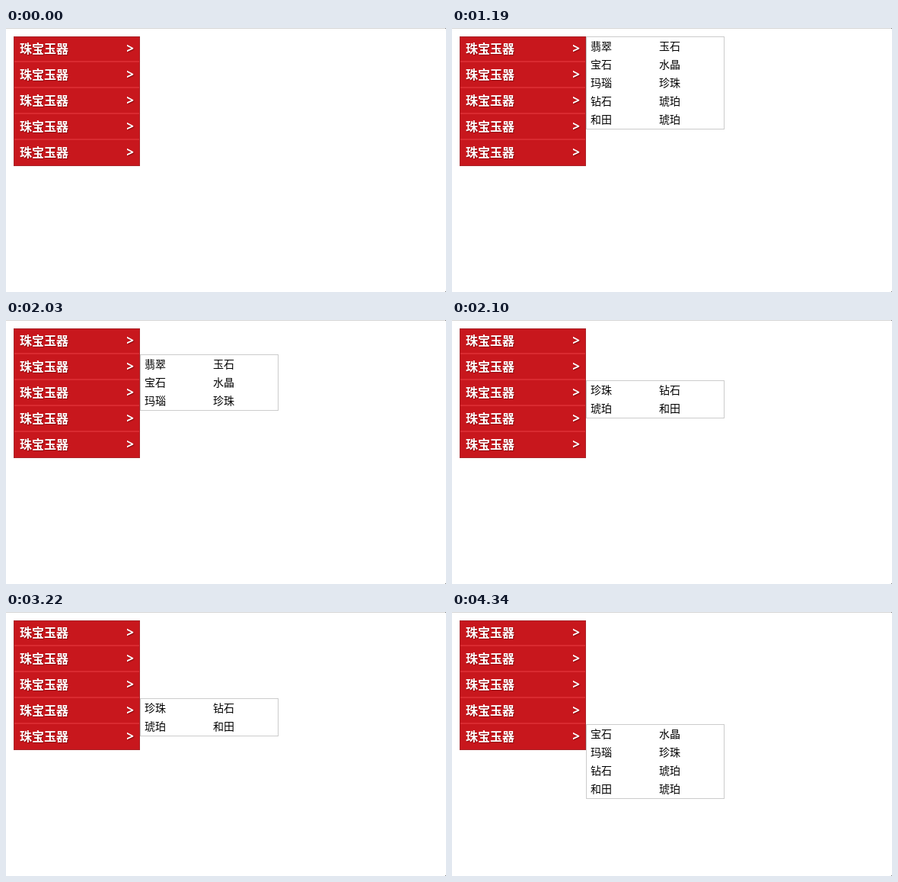
These frames come from a looping animation (578x346 px, 4.41 s). An HTML page:

```html
<!DOCTYPE html>
<html lang="zh-CN">
<head>
<meta charset="utf-8">
<title>Flyout menu</title>
<style>
  html, body { margin: 0; width: 100%; height: 100%; overflow: hidden; background: #fff; }
  svg { display: block; width: 578px; height: 346px; }
  text { font-family: "Noto Sans CJK SC", "Noto Sans CJK", sans-serif; }
  .label { font-size: 16px; font-weight: 700; fill: #fff; text-shadow: 1px 1px 1px #8a0c10; }
  .arrow { font: 700 17px "Noto Sans", sans-serif; fill: #fff; text-anchor: middle; text-shadow: 1px 1px 1px #8a0c10; }
  .item { font-size: 14px; fill: #000; }
</style>
</head>
<body>
<svg id="stage" viewBox="0 0 578 346"></svg>
<script>
const LOOP = 4410, TOP = 11, ROW = 34, LINE = 24;
const stage = document.getElementById('stage');

const menus = [
  { start: 980, items: '翡翠 玉石 宝石 水晶 玛瑙 珍珠 钻石 琥珀 和田 琥珀' },
  { start: 1540, items: '翡翠 玉石 宝石 水晶 玛瑙 珍珠' },
  { start: 2100, items: '珍珠 钻石 琥珀 和田' },
  { start: 2660, items: '珍珠 钻石 琥珀 和田' },
  { start: 3430, items: '宝石 水晶 玛瑙 珍珠 钻石 琥珀 和田 琥珀' }
];

function add(parent, tag, attrs, content) {
  const el = document.createElementNS('http://www.w3.org/2000/svg', tag);
  for (const key in attrs) el.setAttribute(key, attrs[key]);
  if (content) el.textContent = content;
  return parent.appendChild(el);
}

function rect(parent, x, y, width, height, fill) {
  return add(parent, 'rect', { x, y, width, height, fill });
}

// Page edge and the window's corner pixels
rect(stage, 0, 0, 578, 1, '#d6d6d6');
rect(stage, 577, 0, 1, 1, '#777');
rect(stage, 577, 345, 1, 1, '#777');

// Red menu
rect(stage, 10, TOP, 166, 170, '#c8171d');
menus.forEach((menu, i) => {
  const y = TOP + i * ROW;
  if (i) rect(stage, 10, y - 2, 166, 2, '#d92a30');
  add(stage, 'text', { x: 18, y: y + 22, class: 'label' }, '珠宝玉器');
  add(stage, 'text', { x: 163, y: y + 22, class: 'arrow' }, '>');
});
add(stage, 'rect', { x: 10.5, y: TOP + 0.5, width: 165, height: 169, fill: 'none', stroke: '#a9252a' });

// Flyout panels
const panels = menus.map(({ items }, i) => {
  const words = items.split(' ');
  const y = TOP + i * ROW;
  const group = add(stage, 'g', {});
  add(group, 'rect', {
    x: 176.5, y: y + 0.5, width: 181, height: words.length / 2 * LINE + 1,
    fill: '#fff', stroke: '#ccc'
  });
  words.forEach((word, n) => add(group, 'text', {
    x: 182 + n % 2 * 90, y: y + 18 + Math.floor(n / 2) * LINE, class: 'item'
  }, word));
  return group;
});

function draw(now) {
  const t = now % LOOP;
  const open = menus.filter(menu => t >= menu.start).length - 1;
  panels.forEach((panel, i) => panel.setAttribute('visibility', i === open ? 'visible' : 'hidden'));
}

const began = performance.now();
function tick() {
  draw(performance.now() - began);
  requestAnimationFrame(tick);
}
tick();
</script>
</body>
</html>
```
